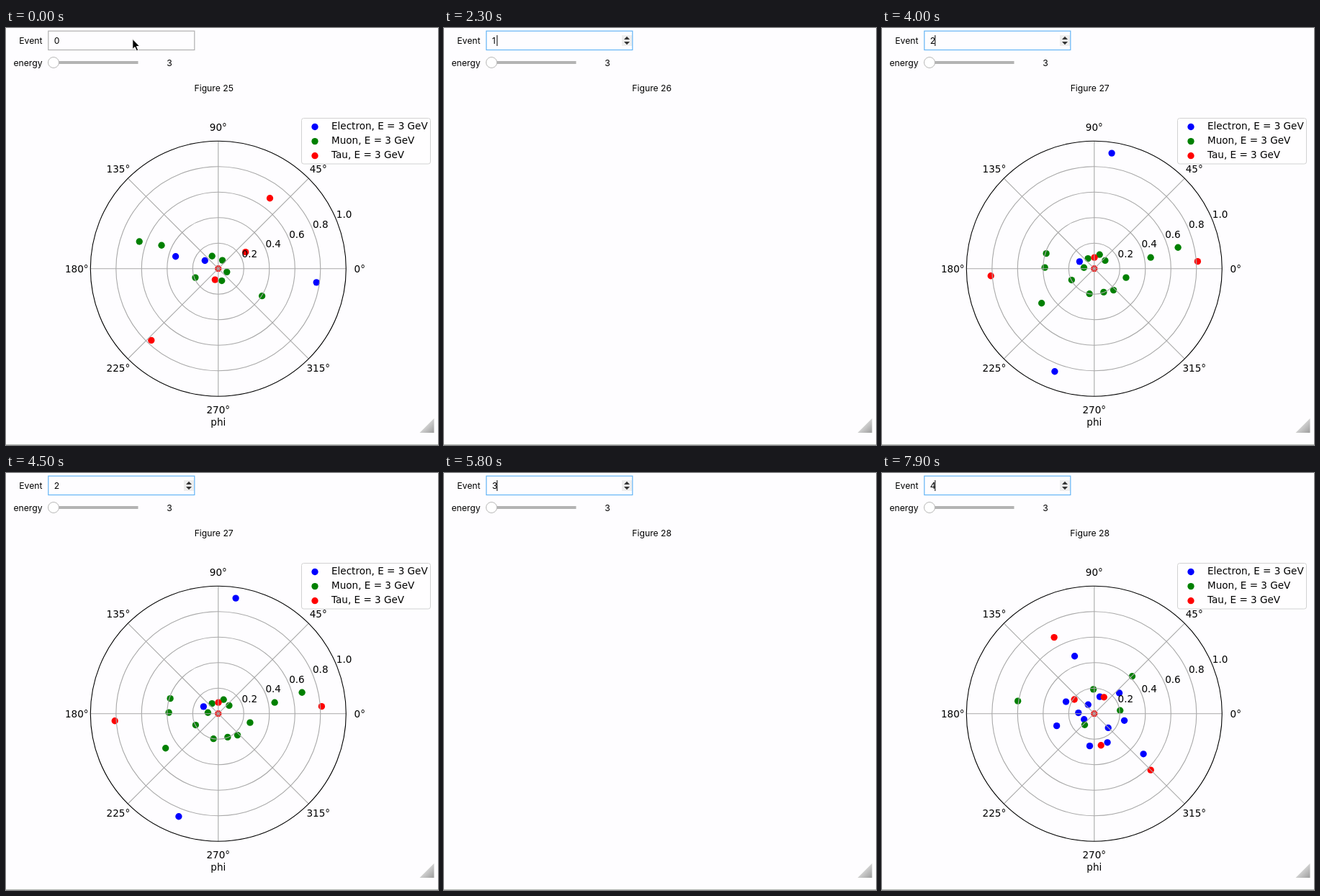
Animation of 600 by 580 pixels, one loop 8 s. Source, as an HTML page:

```html
<!DOCTYPE html>
<html lang="en">
<head>
<meta charset="utf-8">
<title>Event display</title>
<style>
  html, body { margin: 0; width: 100%; height: 100%; overflow: hidden; background: #fefdff; }
  svg { display: block; }
  .ui { font: 12.2px Inter, sans-serif; }
  .plot { font: 13.55px "DejaVu Sans", sans-serif; }
  .mid { text-anchor: middle; }
  .end { text-anchor: end; }
</style>
</head>
<body>
<svg width="600" height="580" viewBox="0 0 600 580">
  <defs>
    <linearGradient id="grip" x1="0" y1="0" x2="1" y2="1">
      <stop offset=".45" stop-color="#d4d4d4"/>
      <stop offset="1" stop-color="#9c9c9c"/>
    </linearGradient>
  </defs>
  <rect width="600" height="580" fill="#fefdff"/>
  <rect y="579" width="600" height="1" fill="#b2b6b2"/>

  <g class="ui">
    <text class="end" x="50.5" y="21.7">Event</text>
    <rect id="field" x="58.8" y="4.2" width="203" height="26.3" fill="#fefdff" stroke-width="1.2"/>
    <text id="value" x="66.7" y="21.7"></text>
    <rect id="caret" y="10" width="1" height="15"/>
    <g id="spinner">
      <rect x="247" y="10" width="14" height="15" fill="#eee"/>
      <path d="M250 16l4-4.2 4 4.2zM250 19l4 4.2 4-4.2z" fill="#333"/>
    </g>
    <text class="end" x="50.5" y="52.7">energy</text>
    <rect x="66" y="46" width="117.5" height="4" fill="#b3b3b3"/>
    <circle cx="66" cy="48" r="7.5" fill="#fff" stroke="#b8b8b8"/>
    <text x="223.3" y="52.7">3</text>
    <text id="caption" class="mid" x="288.7" y="87.5"></text>
  </g>
  <path d="M594.5 543V563H574.5z" fill="url(#grip)"/>

  <g id="plot" class="plot">
    <g id="dots"></g>
    <g id="axes" fill="none" stroke="#a9a9a9" stroke-width="1.1"></g>
    <g id="labels"></g>
    <g id="legend">
      <rect x="410.5" y="125.5" width="179" height="63.5" rx="3" fill="#fff" fill-opacity=".8" stroke="#d2d2d2"/>
    </g>
  </g>

  <path id="arrow" d="M175.8 15.3v14.2l3.2-3 2.3 5.3 2.4-1-2.3-5.2h4.4z" stroke="#fff"/>
  <path id="beam" d="M175 9.5q2.5 0 2.5 2v11q0 2-2.5 2M180 9.5q-2.5 0-2.5 2v11q0 2 2.5 2" fill="none" stroke="#222"/>
</svg>
<script>
const LOOP = 8000, FOCUS = 100, BLINK = 500, CLEAR = 100;
const CX = 294.8, CY = 334.7, R = 177.5, GOLDEN = 137.5;
const COLORS = { Electron: 'blue', Muon: 'green', Tau: 'red' };
const FILLS = Object.values(COLORS);
const TYPED = [900, 3000, 4800, 6600];

// hard: outer hits as [radius, degrees] per particle; soft: number of hits near the centre
const EVENTS = [
  { start: 0, shown: 0, soft: [1, 5, 2], hard: [
    [[.776, -8], [.347, 164]],
    [[.653, 161], [.48, 157.6], [.404, -32]],
    [[.684, 53.8], [.768, 227]]] },
  { start: 2300, shown: 2600, soft: [4, 1, 4], hard: [
    [[.572, 57.3]],
    [[.833, 172.8], [.827, -26.5]],
    [[.389, 92], [.389, -82]]] },
  { start: 3600, shown: 4000, soft: [1, 9, 1], hard: [
    [[.915, 81.4], [.863, 249]],
    [[.676, 14.2], [.45, 11.2], [.394, 162.5], [.387, 178.7], [.493, 213.3]],
    [[.811, 4], [.811, 184]]] },
  { start: 5600, shown: 6200, soft: [10, 3, 3], hard: [
    [[.476, 108.8], [.498, -39.4], [.309, 198]],
    [[.606, 170.6], [.417, 44.6]],
    [[.675, 117.7], [.625, -45]]] }
];

const $ = id => document.getElementById(id);
const show = (el, on) => el.setAttribute('visibility', on ? 'inherit' : 'hidden');

function add(parent, tag, attrs, text) {
  const el = document.createElementNS('http://www.w3.org/2000/svg', tag);
  for (const k in attrs) el.setAttribute(k, attrs[k]);
  if (text) el.textContent = text;
  parent.appendChild(el);
  return el;
}

function polar(r, deg) {
  const a = deg * Math.PI / 180;
  return [CX + R * r * Math.cos(a), CY - R * r * Math.sin(a)];
}

function dot(parent, [cx, cy], fill) {
  add(parent, 'circle', { cx, cy, r: 4.67, fill });
}

function random(seed) {
  return () => (seed = seed * 16807 % 2147483647) / 2147483647;
}

function buildAxes() {
  for (let deg = 0; deg < 360; deg += 45) {
    const [x2, y2] = polar(1, deg), [x, y] = polar(1.107, deg);
    add($('axes'), 'line', { x1: CX, y1: CY, x2, y2 });
    add($('labels'), 'text', { x, y: y + 4.8, class: 'mid' }, deg + '°');
  }
  for (let i = 1; i <= 5; i++) {
    const [x, y] = polar(i / 5, 22.5);
    add($('axes'), 'circle', { cx: CX, cy: CY, r: R * i / 5, stroke: i === 5 ? '#000' : '#a9a9a9' });
    add($('labels'), 'text', { x, y: y - 2.4 }, (i / 5).toFixed(1));
  }
  add($('labels'), 'text', { x: CX, y: 553, class: 'mid' }, 'phi');
}

function buildLegend() {
  Object.keys(COLORS).forEach((name, i) => {
    const y = 137.5 + i * 20.1;
    dot($('legend'), [429, y], COLORS[name]);
    add($('legend'), 'text', { x: 452, y: y + 3.5 }, name + ', E = 3 GeV');
  });
}

function buildHits(event, n) {
  const rnd = random(4001 + n * 977);
  let deg = 360 * rnd();
  event.group = add($('dots'), 'g', {});
  FILLS.forEach((fill, k) => {
    for (const [r, phi] of event.hard[k]) dot(event.group, polar(r, phi), fill);
    for (let i = 0; i < event.soft[k]; i++) {
      deg += GOLDEN;
      dot(event.group, polar(.06 + .22 * rnd(), deg), fill);
    }
  });
  dot(event.group, [CX, CY], 'red');
}

function draw(t) {
  const focused = t >= FOCUS;
  const typed = TYPED.filter(s => s <= t);
  const cleared = TYPED.some(s => t >= s - CLEAR && t < s);
  const age = t - (typed.length ? typed[typed.length - 1] : FOCUS);
  const n = EVENTS.filter(e => e.start <= t).length - 1;

  $('value').textContent = cleared ? '' : typed.length;
  $('caption').textContent = 'Figure ' + (25 + n);
  $('field').setAttribute('stroke', focused ? '#64b5f6' : '#b0b0b0');
  $('caret').setAttribute('x', cleared ? 67 : 73.3);
  show($('caret'), focused && (cleared || Math.floor(age / BLINK) % 2 === 0));
  show($('spinner'), focused);
  show($('arrow'), !focused);
  show($('beam'), focused && t < TYPED[0] - CLEAR);
  show($('plot'), t >= EVENTS[n].shown);
  EVENTS.forEach((e, i) => show(e.group, i === n));
}

buildAxes();
buildLegend();
EVENTS.forEach(buildHits);

const start = performance.now();
function tick() {
  draw((performance.now() - start) % LOOP);
  requestAnimationFrame(tick);
}
tick();
</script>
</body>
</html>
```
